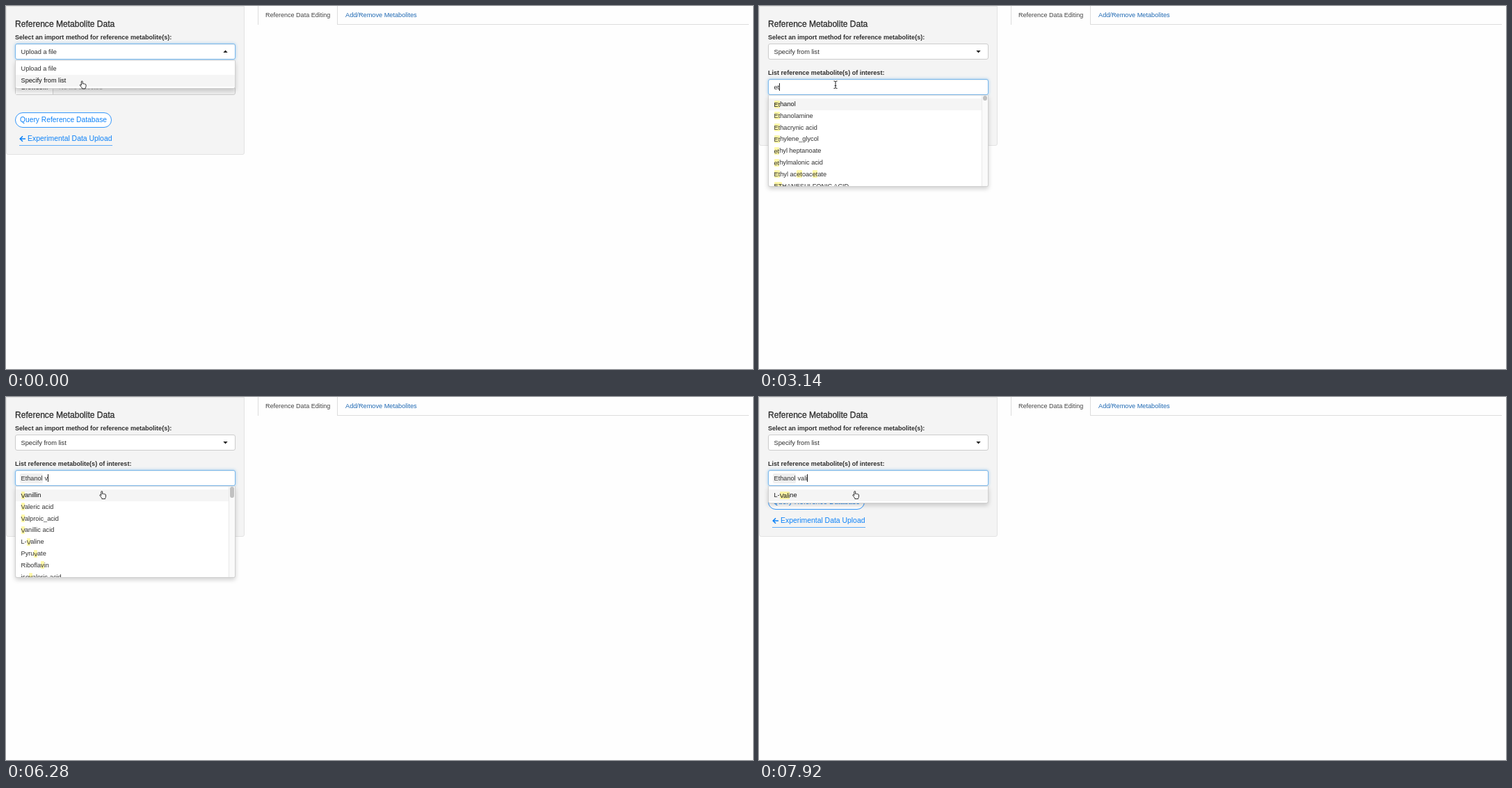
These frames come from a looping animation (1074 by 522 pixels, 8 s). An HTML page:

```html
<!DOCTYPE html>
<html lang="en">
<head>
<meta charset="utf-8">
<title>Reference metabolite picker</title>
<style>
  html, body { margin: 0; width: 100%; height: 100%; overflow: hidden; background: #fefefe; }
  body { position: relative; font: 9.2px/16px "Liberation Sans", Arial, sans-serif; color: #2e2e2e; }
  body *, body *::after { position: absolute; box-sizing: border-box; white-space: pre; }
  body mark { position: static; padding: .5px 0; border-radius: 1px; background: rgba(255, 237, 40, .4); color: inherit; }
  [hidden] { display: none !important; }

  #panel { left: 0; top: 0; width: 343px; height: 201px; background: #f4f4f4; border: 1px solid #e3e3e3; border-radius: 0 0 3px 3px; }
  .file #panel { height: 214px; }
  h1 { left: 13px; top: 18px; margin: 0; font-size: 12.05px; font-weight: 400; -webkit-text-stroke: .3px #2e2e2e; }
  label { left: 13px; font-size: 9.06px; font-weight: 700; }

  .field { left: 13px; width: 317px; background: #fff; border: 1px solid #ccc; border-radius: 3px; }
  .focus { border-color: #7ab8ec; box-shadow: inset 0 1px 1px rgba(0, 0, 0, .06), 0 0 4px rgba(102, 175, 233, .6); }
  .value { left: 7.5px; top: 3px; }
  #method { top: 54px; height: 23px; }
  #method .value { font-size: 9.25px; }
  #method svg { left: 298px; top: 8px; }
  #list { top: 105px; height: 23px; }
  #list .tag { left: 6px; top: 4px; width: 33px; height: 14px; padding-left: 1.5px; line-height: 14px; background: #efefef; border-radius: 2px; }
  .tagged #list .value { left: 41.5px; }
  .caret .focus .value::after { content: ""; left: 100%; top: 2px; width: 1px; height: 11px; background: #222; }

  #upload { left: 13px; top: 106px; width: 317px; height: 22px; background: #eee; border: 1px solid #ccc; border-radius: 3px; }
  #upload b { left: 0; top: 0; width: 54px; height: 20px; padding: 2px 0 0 8px; font-weight: 400; background: #f6f6f6; border-right: 1px solid #ccc; }
  #upload span { left: 62px; top: 2px; color: #999; }

  #actions { left: 0; top: 0; color: #0d82f8; }
  .file #actions { top: 13px; }
  #query { left: 13px; top: 140px; width: 139px; height: 22px; padding: 2px 0 0 6px; font-size: 10.27px; background: #fff; border: 1px solid #3597fa; border-radius: 11px; }
  #back { left: 19px; top: 170px; width: 134px; height: 18px; padding-left: 12px; font-size: 10.42px; border-bottom: 1px solid #62adf8; }
  #back svg { left: 0; top: 3px; }

  #tabs { left: 362px; top: 0; width: 706px; height: 27px; border-bottom: 1px solid #ddd; }
  #tabs span { left: 126px; top: 5px; color: #1f69b3; }
  #tabs b { left: 0; top: 0; width: 115px; height: 27px; padding: 5px 0 0 10px; font-size: 9.02px; font-weight: 400; color: #444; background: #fefefe; border: solid #ddd; border-width: 0 1px; }

  #menu { left: 13px; width: 317px; background: #fff; border: 1px solid #d0d0d0; border-top-color: #e4e4e4; border-radius: 0 0 3px 3px; box-shadow: 0 3px 6px rgba(0, 0, 0, .18); overflow: hidden; }
  .row { left: 0; width: 100%; height: 17px; padding-left: 7.5px; line-height: 17px; color: #303030; }
  .row.on { background: #f5f5f5; color: #111; }
  #track { right: 0; top: 0; width: 9px; height: 100%; background: #fafafa; border-left: 1px solid #e9e9e9; }
  #thumb { left: 1px; width: 6px; border-radius: 3px; background: #c1c1c1; }
  #cursor { left: 0; top: 0; overflow: visible; }
</style>
</head>
<body>
<div id="panel"></div>
<h1>Reference Metabolite Data</h1>
<label style="top:37px">Select an import method for reference metabolite(s):</label>
<div id="method" class="field">
  <span class="value"></span>
  <svg width="7" height="5"><path id="arrow" fill="#222"/></svg>
</div>
<div id="upload"><b>Browse...</b><span>No file selected</span></div>
<div id="pick">
  <label style="top:88px">List reference metabolite(s) of interest:</label>
  <div id="list" class="field"><span class="tag">Ethanol</span><span class="value"></span></div>
</div>
<div id="actions">
  <div id="query">Query Reference Database</div>
  <div id="back"><svg width="10" height="10"><path d="M9 5H1.6M5 1.2L1.2 5L5 8.8" fill="none" stroke="#0d82f8" stroke-width="1.5"/></svg>Experimental Data Upload</div>
</div>
<div id="tabs"><b>Reference Data Editing</b><span>Add/Remove Metabolites</span></div>
<div id="menu"></div>
<svg id="cursor" width="1" height="1">
  <defs><path id="bar" fill="none" d="M-2.5-5Q-.4-5 0-4Q.4-5 2.5-5M0-4V4.5M-2.5 5.5Q-.4 5.5 0 4.5Q.4 5.5 2.5 5.5M-1.3 1.6H1.3"/></defs>
  <g id="beam"><use href="#bar" stroke="#fff" stroke-width="2"/><use href="#bar" stroke="#222"/></g>
  <path id="hand" d="M-2.2.6V-4.6a.95.95 0 0 1 1.9 0V-1.6q.9-.7 1.6.1q1-.5 1.6.3q1.3-.3 1.6.9v2.2q0 1.6-.9 2.5v1H-1.2v-1Q-2 3.2-3.6 1.4q-1.2-1.3-.2-1.8q.8-.3 1.6 1z" fill="#fff" stroke="#222" stroke-width=".95" stroke-linejoin="round"/>
</svg>
<script>
const LOOP = 8000, PITCH = 16.83;
const $ = selector => document.querySelector(selector);
const names = text => text.split("|");

// y and h place the menu, first is the offset of its first row, thumb is [top, height]
const big = (text, query, thumb, first = 4, on = 0) =>
  ({ y: 128, h: 132, first, rows: names(text), query, on, thumb });

const menus = {
  method: { y: 78, h: 41, first: 3, rows: names("Upload a file|Specify from list"), query: "", on: 1 },
  all: big("1,3-diaminopropane|Deoxyguanosine|ADP|AMP|ATP|D-allose|D-fructose|beta-D-Fructose 1,6-bisphosphate", "", [0, 7]),
  e: big("Ethanol|Estrone|Estriol|Erythrose|Estradiol|Erythritol|Ethanolamine|Ergosterol", "e", [0, 7]),
  et: big("Ethanol|Ethanolamine|Ethacrynic acid|Ethylene_glycol|ethyl heptanoate|ethylmalonic acid|Ethyl acetoacetate|ETHANESULFONIC ACID", "et", [0, 7]),
  etha: big("Ethanol|Ethanolamine|Ethacrynic acid|ETHANESULFONIC ACID|Methanol|Methacholine|Dexamethasone|Phosphoethanolamine", "etha", [0, 50]),
  rest: big("(S)|GDP|CoA|CDP|D-Aspartate|Thiamin|D-Fructose 2,6-bisphosphate|Ethanolamine|GTP", "etha", [38, 7], -11, 1),
  v: big("Vanillin|Valeric acid|Valproic_acid|Vanillic acid|L-Valine|Pyruvate|Riboflavin|isovaleric-acid", "v", [0, 16]),
  va: big("Vanillin|Valeric acid|Valproic_acid|Vanillic acid|L-Valine|Lovastatin|isovaleric-acid|5-Aminovaleric acid", "va", [0, 40]),
  val: big("Valeric acid|Valproic_acid|L-Valine|isovaleric-acid|5-Aminovaleric aci|5-Aminovaleric acid|4-methylvaleric acid|4-Methyl-2-oxovaleric acid", "val", [5, 115], .8),
  vali: { y: 128, h: 25, first: 4, rows: ["L-Valine"], query: "vali", on: 0 }
};

// each step changes only the named parts of the state
const steps = [
  [0, { file: true, focus: "method", choice: "Upload a file", entry: "", tagged: false, caret: false, menu: "method", cursor: ["hand", 110.5, 113.5] }],
  [150, { caret: true }],
  [450, { file: false, choice: "Specify from list", caret: false, menu: null }],
  [600, { focus: "", cursor: ["beam", 109, 108] }],
  [1200, { cursor: ["beam", 109, 110] }],
  [1340, { cursor: ["beam", 110, 112] }],
  [1490, { cursor: ["beam", 110, 113] }],
  [1790, { focus: "list", caret: true, menu: "all" }],
  [2240, { caret: false }],
  [2690, { caret: true }],
  [2990, { entry: "e", menu: "e" }],
  [3140, { entry: "et", menu: "et" }],
  [3290, { entry: "etha", menu: "etha" }],
  [3880, { caret: false, cursor: ["beam", 112, 114] }],
  [4030, { cursor: ["beam", 121, 122] }],
  [4180, { cursor: ["hand", 133, 136] }],
  [4330, { caret: true, cursor: ["hand", 139, 141] }],
  [4630, { entry: "", tagged: true, menu: "rest" }],
  [5380, { caret: false }],
  [5830, { caret: true }],
  [6280, { entry: "v", menu: "v" }],
  [6430, { entry: "va", menu: "va" }],
  [6580, { entry: "val", menu: "val" }],
  [6730, { entry: "vali", menu: "vali" }],
  [6870, { entry: "valie", menu: null }],
  [7320, { caret: false }],
  [7920, { entry: "vali", caret: true, menu: "vali" }]
];
let state = {};
const scenes = steps.map(([at, change]) => ({ at, ...(state = { ...state, ...change }) }));

function drawMenu(menu) {
  const box = $("#menu");
  box.hidden = !menu;
  if (!menu) return;
  const { y, h, first, rows, query, on, thumb } = menu;
  const highlight = s => query ? s.replace(new RegExp(query, "gi"), "<mark>$&</mark>") : s;
  box.style.top = y + "px";
  box.style.height = h + "px";
  box.innerHTML = rows.map((s, i) =>
    `<div class="row${i === on ? " on" : ""}" style="top:${first + i * PITCH}px">${highlight(s)}</div>`).join("") +
    (thumb ? `<div id="track"><div id="thumb" style="top:${thumb[0]}px;height:${thumb[1]}px"></div></div>` : "");
}

function draw(s) {
  for (const name of ["file", "tagged", "caret"]) document.body.classList.toggle(name, s[name]);
  for (const id of ["method", "list"]) $("#" + id).classList.toggle("focus", s.focus === id);
  $("#method .value").textContent = s.choice;
  $("#list .value").textContent = s.entry;
  $("#upload").hidden = !s.file;
  $("#pick").hidden = s.file;
  $(".tag").hidden = !s.tagged;
  $("#arrow").setAttribute("d", s.menu === "method" ? "M.3 4L3.5 .5L6.7 4Z" : "M.3 1H6.7L3.5 4.5Z");
  drawMenu(menus[s.menu]);
  const [kind, x, y] = s.cursor;
  for (const id of ["beam", "hand"]) $("#" + id).style.display = id === kind ? "" : "none";
  $("#cursor").style.transform = `translate(${x}px, ${y}px)`;
}

const start = performance.now();
let shown;
function tick() {
  const t = (performance.now() - start) % LOOP;
  const scene = scenes.filter(s => s.at <= t).pop();
  if (scene !== shown) draw(shown = scene);
  requestAnimationFrame(tick);
}
tick();
</script>
</body>
</html>
```
